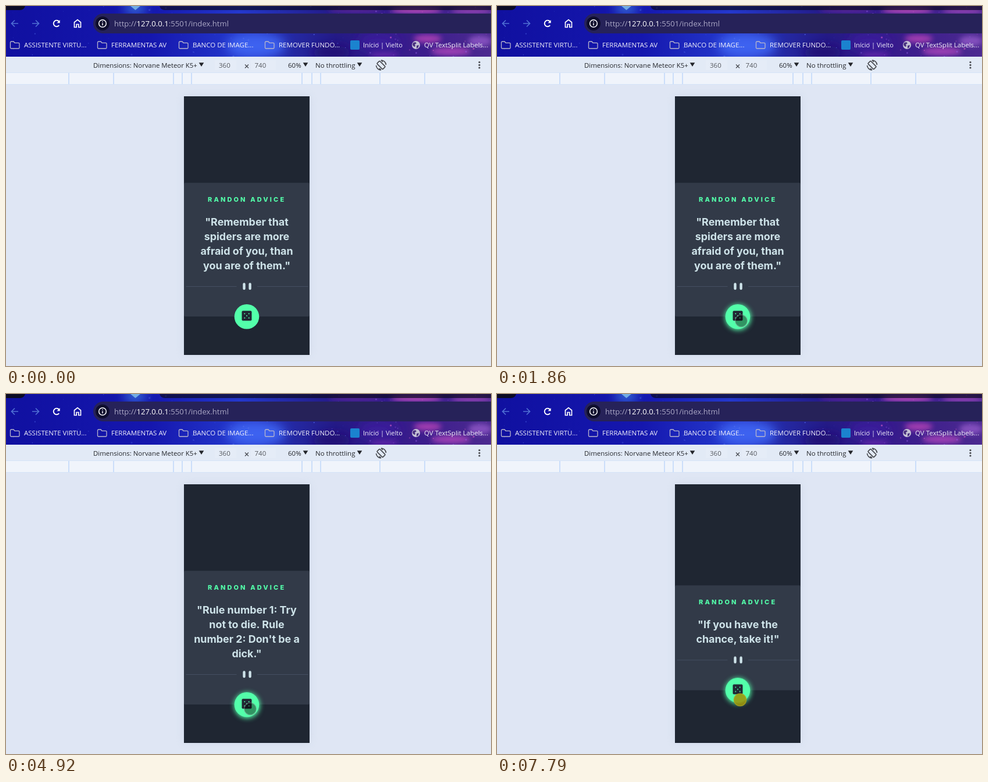
Animation of 834x618 px, one loop 7.99 s. Source, as an HTML page:

```html
<!DOCTYPE html>
<html lang="en">
<head>
<meta charset="utf-8">
<title>Random advice</title>
<style>
html, body { margin: 0; width: 100%; height: 100%; overflow: hidden; background: #dfe6f4; }
svg { display: block; width: 834px; height: 618px; }
text { font-family: "Open Sans", "Noto Sans", sans-serif; font-size: 11.5px; white-space: pre; }
.bookmarks text { fill: #f0effa; }
.toolbar text { fill: #24262b; }
.card text { font-family: Inter, sans-serif; font-weight: 700; font-size: 17.9px; fill: #cee3e9; text-anchor: middle; }
.card .title { font-size: 11px; font-weight: 800; letter-spacing: 3.1px; fill: #53ffaa; text-anchor: start; }

.panel, .upper, .lower, .quote, .glow, .cursor, .press { animation: 7990ms step-end infinite; }
.panel { animation-name: panel; }
.upper { animation-name: upper; }
.lower { animation-name: lower; }
.first { animation-name: first; }
.second { animation-name: second; }
.third { animation-name: third; }
.glow { animation-name: glow; }
.cursor { animation-name: move; }
.press { animation-name: press; }

@keyframes panel {
  0% { y: 303.5px; height: 229.5px; }
  69.83%, 100% { y: 328.5px; height: 180px; }
}
@keyframes upper { 0% { transform: none; } 69.83%, 100% { transform: translateY(25px); } }
@keyframes lower { 0% { transform: none; } 69.83%, 100% { transform: translateY(-24.8px); } }
@keyframes first { 0% { opacity: 1; } 33.16%, 100% { opacity: 0; } }
@keyframes second { 0% { opacity: 0; } 33.16% { opacity: 1; } 69.83%, 100% { opacity: 0; } }
@keyframes third { 0% { opacity: 0; } 69.83%, 100% { opacity: 1; } }
@keyframes glow { 0% { opacity: 0; } 21.77% { opacity: .5; } 23.27%, 100% { opacity: 1; } }
@keyframes press {
  0% { opacity: 0; }
  20.9% { opacity: 1; }
  23.27% { opacity: 0; }
  56.57% { opacity: 1; }
  59.07% { opacity: .6; }
  59.9% { opacity: .3; }
  60.73% { opacity: .1; }
  61.57% { opacity: 0; }
  97.49%, 100% { opacity: 1; }
}
@keyframes move {
  0% { transform: translate(900px, 700px); }
  2.37% { transform: translate(774px, 612px); }
  3.21% { transform: translate(738px, 595px); }
  4.05% { transform: translate(670px, 562px); }
  4.9% { transform: translate(590px, 532px); }
  5.74% { transform: translate(510px, 512px); }
  6.58% { transform: translate(445px, 507px); }
  7.43% { transform: translate(406px, 511px); }
  8.27% { transform: translate(396px, 520px); }
  9.11% { transform: translate(397px, 527px); }
  10.01% { transform: translate(403px, 532px); }
  10.88% { transform: translate(412px, 538px); }
  11.63% { transform: translate(418px, 541.5px); }
  12.51% { transform: translate(419px, 542px); }
  13.39% { transform: translate(420px, 542px); }
  14.39% { transform: translate(420.5px, 541.5px); }
  17.64% { transform: translate(420px, 540.5px); }
  91.61% { transform: translate(419px, 535px); }
  92.49% { transform: translate(418.5px, 529px); }
  93.36%, 100% { transform: translate(418px, 525px); }
}
</style>
</head>
<body>
<svg viewBox="0 0 834 618">
  <defs>
    <linearGradient id="sky">
      <stop offset="0" stop-color="#1010a0"/>
      <stop offset=".3" stop-color="#1517ae"/>
      <stop offset=".48" stop-color="#2438cc"/>
      <stop offset=".6" stop-color="#2427a0"/>
      <stop offset=".68" stop-color="#241a86"/>
      <stop offset=".84" stop-color="#3a1c8c"/>
      <stop offset="1" stop-color="#4c2a90"/>
    </linearGradient>
    <filter id="soft" x="-50%" y="-100%" width="200%" height="300%"><feGaussianBlur stdDeviation="9"/></filter>
    <filter id="mist" x="-50%" y="-100%" width="200%" height="300%"><feGaussianBlur stdDeviation="4"/></filter>
    <filter id="halo" x="-50%" y="-50%" width="200%" height="200%"><feGaussianBlur stdDeviation="4.500"/></filter>
    <filter id="shade" x="-20%" y="-10%" width="140%" height="120%"><feGaussianBlur stdDeviation="8"/></filter>
    <clipPath id="header"><path d="M0 0h834v87H0z"/></clipPath>
    <path id="folder" d="M0 2.500a1.500 1.500 0 0 1 1.500-1.500h4l2 2.300h6.500a1.500 1.500 0 0 1 1.500 1.500v6.700a1.500 1.500 0 0 1-1.500 1.500H1.500a1.500 1.500 0 0 1-1.500-1.500z" fill="none" stroke="#b9b6cc" stroke-width="1.300"/>
    <path id="caret" d="M-4.300 97.300h8.600l-4.300 6.700z" fill="#24262b"/>
  </defs>

  <!-- Browser header -->
  <g clip-path="url(#header)">
    <path d="M0 0h834v88H0z" fill="url(#sky)"/>
    <g filter="url(#soft)">
      <ellipse cx="430" cy="68" rx="50" ry="22" fill="#3d62f0"/>
      <ellipse cx="222" cy="4" rx="20" ry="9" fill="#3a73dc"/>
      <ellipse cx="560" cy="80" rx="34" ry="12" fill="#231173"/>
      <ellipse cx="640" cy="62" rx="34" ry="15" fill="#3a1c9c"/>
    </g>
    <g filter="url(#mist)">
      <ellipse cx="725" cy="56" rx="24" ry="7" fill="#a23cb0"/>
      <ellipse cx="765" cy="78" rx="34" ry="7" fill="#9c3fb4"/>
      <ellipse cx="815" cy="60" rx="20" ry="9" fill="#8350bd"/>
      <ellipse cx="650" cy="84" rx="26" ry="4" fill="#6527ac"/>
      <ellipse cx="600" cy="7" rx="46" ry="5" fill="#5a2599"/>
      <ellipse cx="705" cy="7" rx="44" ry="6" fill="#b44ab8"/>
      <ellipse cx="800" cy="8" rx="34" ry="6" fill="#8c40b0"/>
    </g>
    <g id="stars"></g>
    <path d="M214 0h17l-8.500 7z" fill="#86c4ea" opacity=".8"/>
    <path d="M0 0h33q-2 7-9 7H0z" fill="#0c0b24"/>
    <path d="M264 0h570v7H273q-7 0-9-7z" fill="#0c0b24" opacity=".7"/>
    <rect x="150" y="13" width="720" height="34" rx="17" fill="#262259"/>
  </g>

  <g fill="none" stroke-width="1.700">
    <path d="M21 30H10m5-5.500L9.500 30l5.500 5.500" stroke="#5070d4"/>
    <path d="M45 30h11m-5-5.500l5.500 5.500-5.500 5.500" stroke="#5070d4"/>
    <path d="M91.200 33.200a5.300 5.300 0 1 1 .2-6.200" stroke="#fff" stroke-width="1.900"/>
    <path d="M92.700 24v5.200h-5.200z" fill="#fff"/>
    <path d="M117.500 36.500V28l5.500-4.300 5.500 4.300v8.500h-3.700v-5h-3.600v5z" stroke="#fff"/>
    <circle cx="166" cy="30" r="12" fill="#0e0d2e"/>
    <circle cx="166" cy="30" r="6.300" stroke="#fff" stroke-width="1.500"/>
    <path d="M166 29.300v4M166 26.300v1.500" stroke="#fff" stroke-width="1.500"/>
  </g>
  <text x="186" y="35" style="font-size:13.100px" fill="#aaa7c5">http://<tspan fill="#fff">127.0.0.1</tspan>:5501/index.html</text>

  <g class="bookmarks">
    <use href="#folder" x="7.500" y="60"/><text x="31" y="71">ASSISTENTE VIRTU...</text>
    <use href="#folder" x="157.500" y="60"/><text x="181" y="71">FERRAMENTAS AV</text>
    <use href="#folder" x="297.500" y="60"/><text x="321" y="71">BANCO DE IMAGE...</text>
    <use href="#folder" x="445.500" y="60"/><text x="469" y="71">REMOVER FUNDO...</text>
    <rect x="592" y="59" width="16" height="16" rx="2" fill="#1b83cf"/>
    <text x="614" y="71" style="font-size:11px">Início | Vielto</text>
    <circle cx="705" cy="67" r="7" fill="#c5c2d6"/>
    <path d="M700 63l4-1 2 2-3 2 1 3-2 1-3-3zM706 68l4-1-1 4-3 2z" fill="#48307f"/>
    <text x="719" y="71">QV TextSplit Labels...</text>
  </g>

  <!-- Device toolbar and ruler -->
  <g class="toolbar">
    <path d="M0 87h834v28H0z" fill="#e2eaf6"/>
    <path d="M0 115h834v20H0z" fill="#f0f4fb"/>
    <path d="M359 93h37v17h-37zM421 93h43v17h-43z" fill="#e5ecf7"/>
    <path d="M0 114.500h834M0 134.500h834" stroke="#d5e3f8"/>
    <path d="M108 115v19m77-19v19m103-19v19m15-19v19m16-19v19m190-19v19m17-19v19m15-19v19m102-19v19m77-19v19" stroke="#cbdefa" stroke-width="2"/>
    <text x="150" y="106" style="font-size:11.400px">Dimensions: Norvane Meteor K5+</text>
    <text x="366" y="106" style="fill:#56595f">360</text>
    <path d="M411 100.500l6 6m0-6l-6 6" stroke="#45484e" stroke-width="1.200"/>
    <text x="427.500" y="106" style="fill:#56595f">740</text>
    <text x="485" y="106">60%</text>
    <text x="532" y="106">No throttling</text>
    <use href="#caret" x="336"/><use href="#caret" x="515"/><use href="#caret" x="608"/>
    <g transform="translate(645 101.500)" fill="none" stroke="#46484d" stroke-width="1.600">
      <rect x="-3.300" y="-7" width="6.600" height="14" rx="1" transform="rotate(-45)"/>
      <path d="M0-8.500a8.500 8.500 0 0 1 8.500 8M0 8.500a8.500 8.500 0 0 1-8.500-8M0-8.500l3 3M0 8.500l-3-3"/>
    </g>
    <g fill="#46484d"><circle cx="814" cy="96.500" r="1.600"/><circle cx="814" cy="101.300" r="1.600"/><circle cx="814" cy="106" r="1.600"/></g>
  </g>

  <!-- Phone page -->
  <path d="M0 135h834v483H0z" fill="#dfe6f4"/>
  <path d="M306 155h216v444H306z" fill="#aebbd0" opacity=".3" filter="url(#shade)"/>
  <path d="M306 155h216v444H306z" fill="#1f2632"/>
  <g class="card">
    <rect class="panel" x="306" y="303.500" width="216" height="229.500" rx="2" fill="#323a48"/>
    <g class="upper">
      <text class="title" x="347" y="336">RANDON ADVICE</text>
      <g class="quote first">
        <text x="414" y="377">"Remember that</text>
        <text x="414" y="402">spiders are more</text>
        <text x="414" y="427">afraid of you, than</text>
        <text x="414" y="452">you are of them."</text>
      </g>
      <g class="quote second">
        <text x="414" y="377">"Rule number 1: Try</text>
        <text x="414" y="402">not to die. Rule</text>
        <text x="414" y="427">number 2: Don't be a</text>
        <text x="414" y="452">dick."</text>
      </g>
      <g class="quote third">
        <text x="414" y="377">"If you have the</text>
        <text x="414" y="402">chance, take it!"</text>
      </g>
    </g>
    <g class="lower">
      <path d="M309.500 481.500h87M432 481.500h87.500" stroke="#444f61"/>
      <path d="M409.500 477.500v7.500M419.600 477.500v7.500" stroke="#cee3e9" stroke-width="4.400" stroke-linecap="round"/>
      <circle class="glow" cx="414.500" cy="534.500" r="22" fill="#53ffaa" filter="url(#halo)"/>
      <circle cx="414" cy="533.300" r="21.300" fill="#53ffaa"/>
      <rect x="405.500" y="523.300" width="17" height="17" rx="2" fill="#202733"/>
      <g fill="#53ffaa">
        <circle cx="410.300" cy="528.200" r="1"/><circle cx="417.700" cy="528.200" r="1"/>
        <circle cx="414" cy="531.800" r="1"/>
        <circle cx="410.300" cy="535.500" r="1"/><circle cx="417.700" cy="535.500" r="1"/>
      </g>
    </g>
  </g>

  <g class="cursor">
    <circle r="10.300" fill="#000" fill-opacity=".42" stroke="#8a8d90" stroke-opacity=".5" stroke-width="1.200"/>
    <circle class="press" r="11.300" fill="#b3a608" fill-opacity=".76"/>
  </g>
</svg>
<script>
// Scatter the wallpaper stars: sparse blue on the left, denser pink on the right.
let seed = 7;
const random = () => (seed = seed * 16807 % 2147483647) / 2147483647;
const stars = document.getElementById('stars');
for (let i = 0; i < 170; i++) {
  const x = 834 * Math.pow(random(), .65);
  const star = document.createElementNS('http://www.w3.org/2000/svg', 'circle');
  const color = x > 590 ? (random() < .5 ? '#d65cc4' : '#8a58dd') : '#5470ee';
  const attributes = { cx: x, cy: 88 * random(), r: .4 + 1.3 * random() ** 3, fill: color, opacity: .25 + .5 * random() };
  for (const name in attributes) star.setAttribute(name, attributes[name]);
  stars.append(star);
}
</script>
</body>
</html>
```
